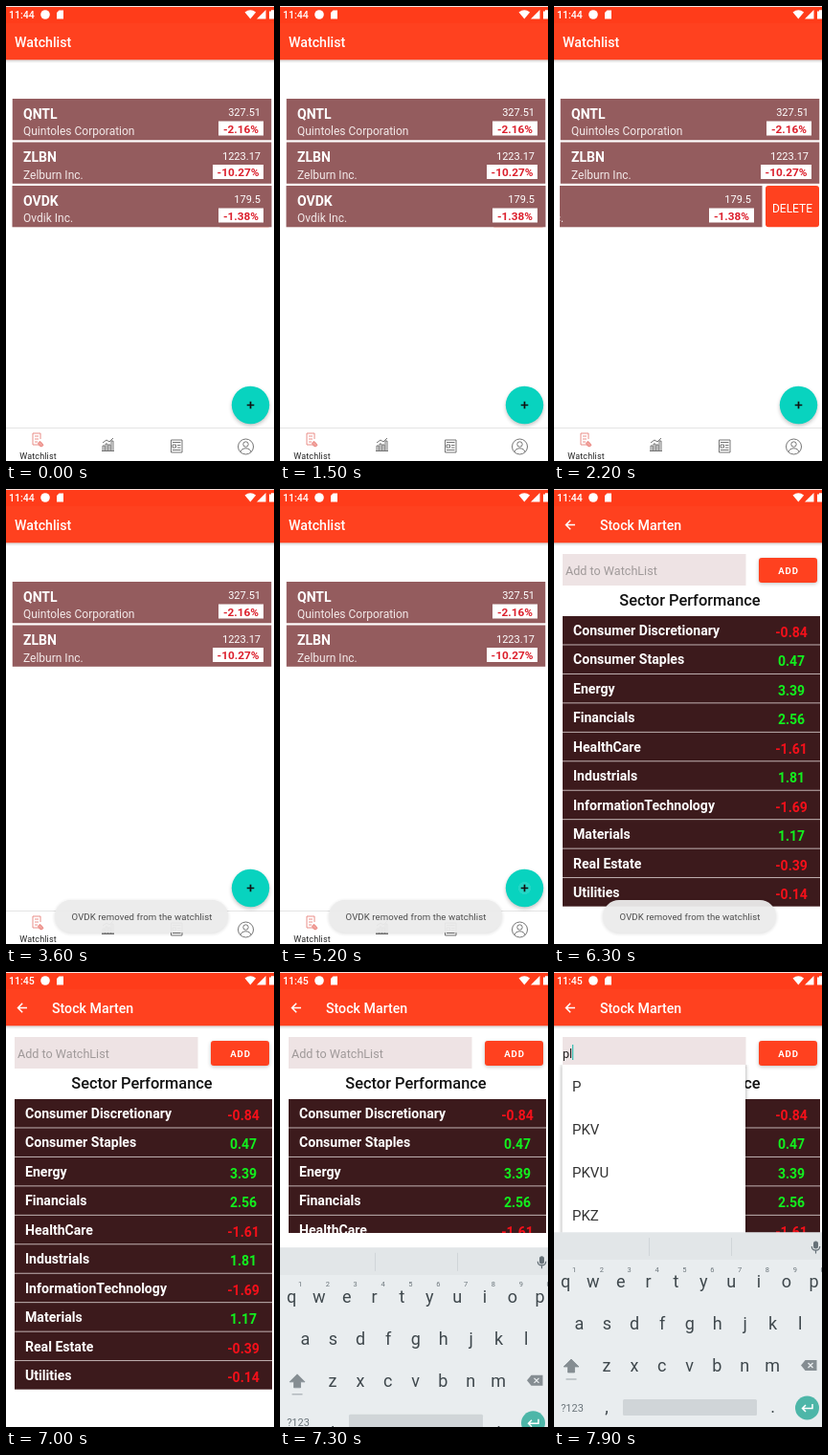
Write an HTML page that moves like this. It is 280x476 px and loops after 8000 ms.

```html
<!DOCTYPE html>
<html lang="en">
<head>
<meta charset="utf-8">
<title>Watchlist</title>
<style>
  html, body { margin: 0; width: 100%; height: 100%; overflow: hidden; background: #fff; }
  svg { display: block; width: 100vw; height: 100vh; font-family: Roboto, Arial, sans-serif; }
  .mid { text-anchor: middle; }
  .end { text-anchor: end; }
  .b { font-weight: 700; }
  .m { font-weight: 500; }

  .anim { animation: 8s linear infinite both; }
  .step { animation-timing-function: step-end; }
  /* The phone screen is a little wider and taller than the stage. */
  .page { transform-origin: 141.5px 257px; }
  #watch { animation-name: watch; }
  #sectors { animation-name: sectors; }
  #swipe { animation-name: swipe; }
  #third { animation-name: third; }
  #press { animation-name: press; }
  #ripple { animation-name: ripple; transform-origin: 255.5px 417.5px; }
  #toast { animation-name: toast; }
  #early { animation-name: early; }
  #late { animation-name: late; }
  #keys { animation-name: keys; }
  #blank { animation-name: blank; }
  #hint { animation-name: hint; }
  #drop { animation-name: drop; }
  #one { animation-name: one; }
  #two { animation-name: two; }

  @keyframes watch { 0%, 67.4% { transform: scale(1) } 70% { transform: scale(1.05) } 75%, 100% { transform: scale(1.1) } }
  @keyframes sectors {
    0%, 67.4% { transform: scale(.85); opacity: 0 }
    68.75% { transform: scale(.925); opacity: 1 }
    70% { transform: scale(.966) }
    71.25% { transform: scale(.977) }
    74%, 100% { transform: scale(1); opacity: 1 }
  }
  @keyframes swipe {
    0%, 18.6% { transform: translateX(0); animation-timing-function: ease-in-out }
    27.4%, 100% { transform: translateX(-60px) }
  }
  @keyframes third { 0%, 36.3% { opacity: 1 } 38.5%, 100% { opacity: 0 } }
  @keyframes press { 0%, 35% { opacity: 0 } 36.2%, 100% { opacity: .22 } }
  @keyframes ripple {
    0%, 64.9% { transform: scale(.3); opacity: 0 }
    65.2% { opacity: .3 }
    67.4%, 100% { transform: scale(1); opacity: 0 }
  }
  @keyframes toast { 0%, 38% { opacity: 0 } 43%, 82% { opacity: .95 } 87%, 100% { opacity: 0 } }
  @keyframes early { 0% { opacity: 1 } 85%, 100% { opacity: 0 } }
  @keyframes late { 0% { opacity: 0 } 85%, 100% { opacity: 1 } }
  @keyframes keys {
    0%, 89.4% { transform: translateY(206px) }
    90% { transform: translateY(110px) }
    91.2% { transform: translateY(16px) }
    92% { transform: translateY(14px) }
    93.75%, 100% { transform: translateY(0) }
  }
  @keyframes blank { 0% { opacity: 0 } 90%, 100% { opacity: 1 } }
  @keyframes hint { 0% { opacity: 1 } 97.5%, 100% { opacity: 0 } }
  @keyframes drop { 0% { opacity: 0 } 97.5%, 100% { opacity: 1 } }
  @keyframes one { 0% { opacity: 0 } 97.5% { opacity: 1 } 98.7%, 100% { opacity: 0 } }
  @keyframes two { 0% { opacity: 0 } 98.7%, 100% { opacity: 1 } }
</style>
</head>
<body>
<svg viewBox="0 0 280 476" preserveAspectRatio="none">
  <defs>
    <clipPath id="listClip"><rect x="6.500" y="90" width="271" height="150"/></clipPath>
    <clipPath id="dropClip"><rect x="0" y="97" width="210" height="176"/></clipPath>
    <filter id="soft" x="-30%" y="-30%" width="160%" height="160%"><feGaussianBlur stdDeviation="2"/></filter>
    <linearGradient id="fade" x2="0" y2="1">
      <stop stop-color="#000" stop-opacity=".16"/><stop offset="1" stop-color="#000" stop-opacity="0"/>
    </linearGradient>
  </defs>

  <!-- Watchlist page -->
  <g id="watch" class="anim page">
    <rect x="-3" y="-40" width="289" height="600" fill="#fff"/>
    <rect x="-3" y="-40" width="289" height="96.300" fill="#ff411f"/>
    <rect x="-3" y="56.300" width="289" height="3.500" fill="url(#fade)"/>
    <text x="9" y="42.500" class="m" font-size="14.2" fill="#fff">Watchlist</text>
    <g id="stocks" clip-path="url(#listClip)"></g>

    <path d="M-3 441.500H286" stroke="#e4e4e4"/>
    <g fill="none" stroke="#e8827c" stroke-width=".9">
      <path d="M28 447h8v6M28 447v12h6M30 450h4M30 453h4M30 456h3"/>
      <path d="M35 460l-1.500-2.500 1.500-2 2 1 2 3-2 1.500z" fill="#f2a39d"/>
    </g>
    <text x="33.500" y="473.700" class="mid" font-size="9" fill="#222" letter-spacing=".15">Watchlist</text>
    <g fill="none" stroke="#666" stroke-width=".9">
      <path d="M101 465v-5h2v5M104 465v-7h2v7M107 465v-6h2v6M110 465v-10h2v10M100 465.500h13M101 457l4-3 3 2 4-4"/>
      <path d="M172.500 454h11.500v13h-11.500zM174 456.500h8.500M174 459h3.500v3h-3.500zM179 459.500h3.500M179 462h3.500M174 464.500h8.500"/>
      <circle cx="250.500" cy="461" r="8"/>
      <circle cx="250.500" cy="458.500" r="2.700"/>
      <path d="M245 466.500c1-5 10-5 11 0"/>
    </g>

    <circle cx="255.500" cy="419.500" r="19.500" fill="#000" opacity=".26" filter="url(#soft)"/>
    <circle cx="255.500" cy="417.500" r="19.700" fill="#08d3bf"/>
    <circle id="ripple" class="anim" cx="255.500" cy="417.500" r="19.700" fill="#fff"/>
    <path d="M251.700 417.500h7.600M255.500 413.700v7.600" stroke="#111" stroke-width="1.700"/>
  </g>

  <!-- Sector page -->
  <g id="sectors" class="anim page">
    <rect x="-2.500" width="288" height="480.500" fill="#fff"/>
    <rect x="-2.500" y="480.500" width="288" height="33" fill="#151515"/>
    <rect x="-2.500" width="288" height="56.300" fill="#ff411f"/>
    <rect x="-2.500" y="56.300" width="288" height="3.500" fill="url(#fade)"/>
    <path d="M22 37.500h-9M17.200 32.800l-4.700 4.700 4.700 4.700" fill="none" stroke="#fff" stroke-width="1.500"/>
    <text x="48" y="42.500" class="m" font-size="14.2" fill="#fff">Stock Marten</text>

    <rect x="9" y="68" width="191.500" height="33" fill="#eee3e4"/>
    <text id="hint" class="anim step" x="12" y="89.500" font-size="12.6" fill="#a09a9a">Add to WatchList</text>
    <rect x="214" y="73.500" width="61" height="25.500" rx="3" fill="#000" opacity=".25" filter="url(#soft)"/>
    <rect x="214" y="72" width="61" height="26" rx="3" fill="#ff411f"/>
    <text x="245" y="89" class="mid b" font-size="9.600" fill="#fff" letter-spacing=".8">ADD</text>
    <text x="142" y="121.500" class="mid m" font-size="16.4" fill="#111">Sector Performance</text>
    <g id="table"></g>
    <rect id="blank" class="anim step" x="-2.500" y="273" width="288" height="207" fill="#fff"/>

    <g id="drop" class="anim step">
      <g clip-path="url(#dropClip)">
        <rect x="8.500" y="97" width="191.500" height="200" fill="#000" opacity=".4" filter="url(#soft)"/>
        <rect x="8.500" y="96" width="191.500" height="200" fill="#fff"/>
        <g id="options"></g>
      </g>
      <g font-size="12.6" fill="#222">
        <g id="one" class="anim step"><text x="9" y="89.500">p</text><path d="M16.800 76v16" stroke="#10b8a8"/></g>
        <g id="two" class="anim step"><text x="9" y="89.500">pl</text><path d="M19.700 76v16" stroke="#10b8a8"/></g>
      </g>
    </g>
  </g>

  <!-- Keyboard -->
  <g id="keys" class="anim">
    <rect y="272.500" width="280" height="210" fill="#e9edef"/>
    <rect y="272.500" width="280" height="28.500" fill="#e2e6e8"/>
    <path d="M99.500 278v19M185.500 278v19" stroke="#d0d5d8"/>
    <g fill="none" stroke="#667178" stroke-width="1.200">
      <rect x="271.600" y="282" width="3.800" height="7" rx="1.900" fill="#667178"/>
      <path d="M269.300 287c0 5.500 8.400 5.500 8.400 0M273.500 291.500v3"/>
    </g>
    <g id="letters" class="mid"></g>
    <path d="M18 405l8 8h-4.500v6h-7v-6H10zM12.500 426h11" fill="#858d92" stroke="#858d92" stroke-width=".8"/>
    <path d="M258 411.500l4.500-5.500h12v11h-12z" fill="#858d92"/>
    <path d="M265.500 409l5 5M270.500 409l-5 5" stroke="#e9edef" stroke-width="1.300"/>
    <text x="19" y="459.500" class="mid" font-size="11" fill="#6b757b">?123</text>
    <rect x="72" y="447" width="140" height="17" rx="1.500" fill="#d0d5d8"/>
    <circle cx="264.500" cy="456" r="12.500" fill="#4db6a8"/>
    <path d="M270 452v4.500h-10M263 453l-3.500 3.500 3.500 3.500" fill="none" stroke="#fff" stroke-width="1.500"/>
  </g>

  <!-- Toast -->
  <g id="toast" class="anim">
    <rect x="51" y="431" width="181" height="34" rx="17" fill="#000" opacity=".15" filter="url(#soft)"/>
    <rect x="51" y="430" width="181" height="34" rx="17" fill="#ebebeb"/>
    <text x="142" y="450.500" class="mid" font-size="9.600" fill="#444" letter-spacing=".09">OVDK removed from the watchlist</text>
  </g>

  <!-- Status bar -->
  <rect width="280" height="18" fill="#ff3c1a"/>
  <rect width="280" height="1" fill="#fbe6e2"/>
  <g fill="#fff">
    <g class="m" font-size="10.6">
      <text id="early" class="anim step" x="3" y="13">11:44</text>
      <text id="late" class="anim step" x="3" y="13">11:45</text>
    </g>
    <circle cx="41" cy="9" r="4.800"/>
    <path d="M55.500 4.500h4.500v9h-7v-6.500z"/>
    <path d="M249.500 6.500q5.800-4.500 11.600 0L255.300 13.500z"/>
    <path d="M271.500 4v9.500h-9.500z"/>
    <path d="M275 5.500h2v-1.200h3v9.200h-5z"/>
  </g>
</svg>

<script>
  const $ = id => document.getElementById(id);
  const text = (x, y, size, str, cls = "", fill = "#fff") =>
    `<text x="${x}" y="${y}" font-size="${size}" class="${cls}" fill="${fill}">${str}</text>`;
  const rect = (x, y, w, h, fill, extra = "") =>
    `<rect x="${x}" y="${y}" width="${w}" height="${h}" fill="${fill}" ${extra}/>`;

  // Stock cards
  const card = (y, code, name, price, change) => {
    const w = change.length > 6 ? 53 : 47;
    return rect(6.5, y, 271, 43.3, "#945c5e") +
      text(18, y + 20.5, 14, code, "b") +
      text(18, y + 38, 12, name, "", "#f3e9e9") +
      text(266, y + 18, 11, price, "end") +
      rect(269 - w, y + 23.5, w, 15, "#fff") +
      text(269 - w / 2, y + 35.5, 11.8, change, "mid b", "#dc1f2c");
  };
  $("stocks").innerHTML =
    card(97, "QNTL", "Quintoles Corporation", "327.51", "-2.16%") +
    card(142.5, "ZLBN", "Zelburn Inc.", "1223.17", "-10.27%") +
    `<g id="third" class="anim">
      ${rect(221, 188, 56, 43.3, "#ff411f", 'rx="3"')}
      ${text(249, 215.5, 12, "DELETE", "mid")}
      ${rect(221, 188, 56, 43.3, "#fff", 'rx="3" id="press" class="anim"')}
      <g id="swipe" class="anim">${card(188, "OVDK", "Ovdik Inc.", "179.5", "-1.38%")}</g>
    </g>`;

  // Sector table
  const sectors = [
    ["Consumer Discretionary", "-0.84"], ["Consumer Staples", "0.47"], ["Energy", "3.39"],
    ["Financials", "2.56"], ["HealthCare", "-1.61"], ["Industrials", "1.81"],
    ["InformationTechnology", "-1.69"], ["Materials", "1.17"], ["Real Estate", "-0.39"], ["Utilities", "-0.14"]
  ];
  $("table").innerHTML = rect(9, 133, 269, 304, "#c9bcbc") + sectors.map(([name, value], i) => {
    const y = 133 + i * 30.45;
    return rect(9, y, 269, 29.5, "#3c1a1c") +
      text(20, y + 20, 14.1, name, "b") +
      text(248, y + 22, 14, value, "mid b", value < 0 ? "#f5101a" : "#12f01e");
  }).join("");

  $("options").innerHTML = ["P", "PKV", "PKVU", "PKZ"]
    .map((s, i) => text(19, 125 + i * 45, 15, s, "", "#333")).join("");

  // Keyboard letters
  const keyRow = (str, x, y, size = 18, fill = "#3f484d") =>
    [...str].map((c, i) => text(x + i * 28.85, y, size, c, "", fill)).join("");
  $("letters").innerHTML =
    keyRow("qwertyuiop", 12, 330) + keyRow("asdfghjkl", 26.5, 374) +
    keyRow("zxcvbnm", 55, 418) + keyRow(",", 55, 461) + keyRow(".", 228.5, 461) +
    keyRow("1234567890", 21, 313.5, 7.5, "#6b757b");
</script>
</body>
</html>
```
